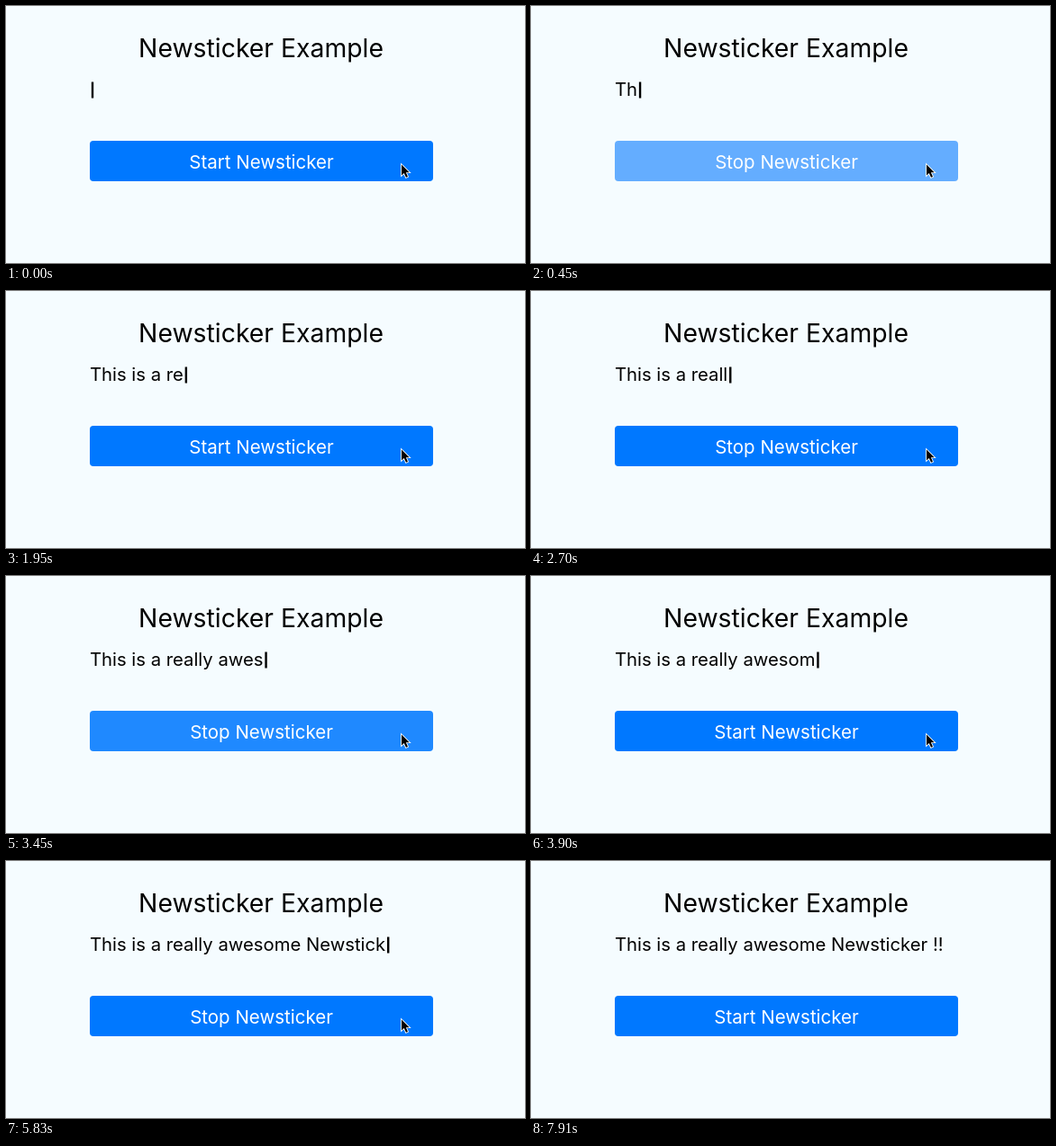
An HTML page with a canvas for the animation above (8160 ms loop, 576 px wide and 286 px high).

```html
<!DOCTYPE html>
<html lang="en">
<head>
<meta charset="utf-8">
<title>Newsticker Example</title>
<style>
  html, body { margin: 0; width: 100%; height: 100%; overflow: hidden; background: #f5fcff; }
  canvas { display: block; }
</style>
</head>
<body>
<canvas width="576" height="286"></canvas>
<script>
const ctx = document.querySelector('canvas').getContext('2d');
const LOOP = 8160, TICK = 149.2, CHAR_MS = 138, BLINK_MS = 500;
const MESSAGE = 'This is a really awesome Newsticker !!';
const FONT = 'Inter, Roboto, sans-serif';

const toggles = [170, 1930, 2255, 3720, 4380]; // typing starts, stops, starts ...
const presses = [350, 1730, 2440, 3600, 4500]; // moments the button is faintest

// Total time spent typing: each start counts up, each stop counts down.
const typingTime = t => toggles.reduce(
  (sum, start, i) => sum + (i % 2 ? -1 : 1) * Math.max(0, t - start), 0);

const buttonAlpha = t => Math.min(1, ...presses.map(p => 0.2 + Math.abs(t - p) / 250));

function write(text, x, y, size, color, align) {
  ctx.font = `${size}px ${FONT}`;
  ctx.fillStyle = color;
  ctx.textAlign = align;
  ctx.fillText(text, x, y);
}

function drawTicker(typed, caretOn) {
  write(typed, 93, 99.5, 20.28, '#000', 'left');
  if (caretOn) ctx.fillRect(93 + ctx.measureText(typed).width + 1.8, 84.5, 2.4, 18);
}

function drawButton(label, alpha) {
  ctx.globalAlpha = alpha;
  ctx.fillStyle = '#0078ff';
  ctx.beginPath();
  ctx.roundRect(93, 150, 381, 45, 4);
  ctx.fill();
  ctx.globalAlpha = 1;
  write(label + ' Newsticker', 283.5, 180.5, 20.5, '#fff', 'center');
}

const arrow = new Path2D('M0 0V14.2L3.3 11.2L5.9 16.8L8.2 15.8L5.7 10.3H10.2Z');

// The pointer rests on the button, then speeds off to the lower right.
function drawPointer(t) {
  const away = (Math.max(0, t - 7160) / 300) ** 2;
  ctx.save();
  ctx.translate(439 + 47 * away, 176.5 + 87 * away);
  ctx.scale(0.85, 0.85);
  ctx.lineWidth = 2;
  ctx.strokeStyle = '#fff';
  ctx.stroke(arrow);
  ctx.fillStyle = '#000';
  ctx.fill(arrow);
  ctx.restore();
}

function draw(t) {
  ctx.fillStyle = '#f5fcff';
  ctx.fillRect(0, 0, 576, 286);
  write('Newsticker Example', 283, 57, 28.35, '#000', 'center');

  const count = Math.floor(typingTime(t) / CHAR_MS);
  const done = count >= MESSAGE.length;
  const running = !done && toggles.filter(start => start <= t).length % 2;
  const blinkOn = (t - 300) % (2 * BLINK_MS) < BLINK_MS;

  drawTicker(MESSAGE.slice(0, count), !done || blinkOn);
  drawButton(running ? 'Stop' : 'Start', buttonAlpha(t));
  drawPointer(t);
}

function frame() {
  const now = performance.now() % LOOP;
  draw(Math.floor(now / TICK) * TICK);
  requestAnimationFrame(frame);
}
frame();
</script>
</body>
</html>
```
